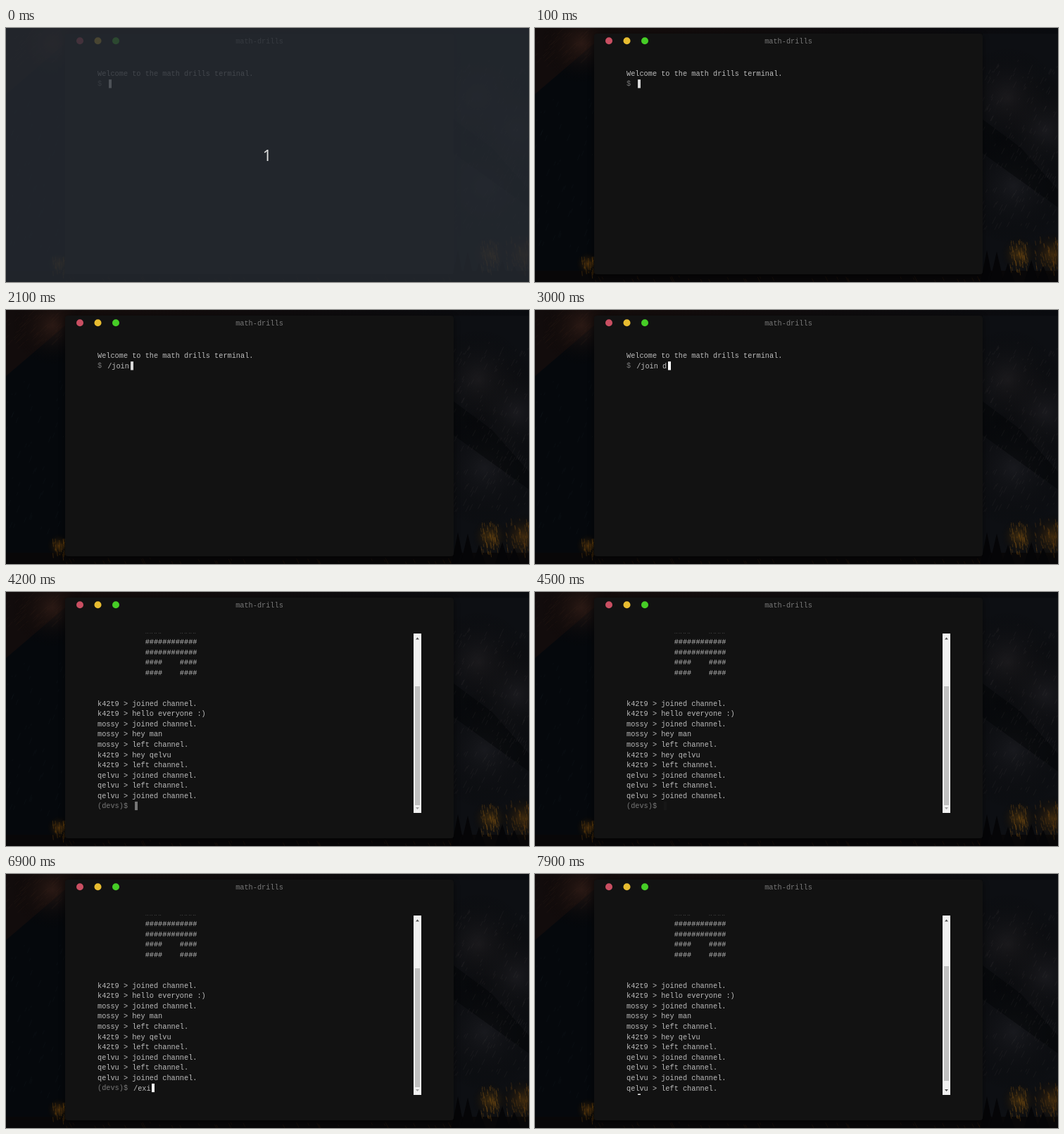
Recreate the animation shown at these times as an HTML page with a canvas. Size 743 by 361 pixels, loop 8000 ms.

```html
<!DOCTYPE html>
<html lang="en">
<head>
<meta charset="utf-8">
<title>Math drills terminal</title>
<style>
  html, body { margin: 0; width: 100%; height: 100%; overflow: hidden; background: #06080b; }
  canvas, svg { position: absolute; left: 0; top: 0; width: 743px; height: 361px; }
  text { font: 10.25px "Liberation Mono", "Courier New", monospace; fill: #bcbcbc; white-space: pre; }
  .dim { fill: #777; }
  .count { font: 22px "Noto Sans", "Open Sans", sans-serif; fill: #dcdcdc; }
</style>
</head>
<body>
<canvas id="scene" width="743" height="361"></canvas>
<svg viewBox="0 0 743 361">
  <defs>
    <clipPath id="pane"><rect x="120" y="58.6" width="459" height="255.4"/></clipPath>
    <filter id="soft" x="-5%" y="-5%" width="110%" height="115%"><feGaussianBlur stdDeviation="4"/></filter>
  </defs>
  <rect x="84" y="10" width="552" height="343" rx="4" opacity=".55" filter="url(#soft)"/>
  <rect x="84" y="8" width="552" height="342" rx="4" fill="#121212"/>
  <circle cx="105" cy="18.2" r="5" fill="#c94f62"/>
  <circle cx="130.5" cy="18.2" r="5" fill="#e8bc30"/>
  <circle cx="156" cy="18.2" r="5" fill="#46cd26"/>
  <text class="dim" x="360" y="22.3" text-anchor="middle">math-drills</text>

  <g clip-path="url(#pane)">
    <g id="intro">
      <text x="130" y="68.3">Welcome to the math drills terminal.</text>
      <text id="notice" x="130" y="82.9">connecting to devs</text>
    </g>
    <g id="log"></g>
    <text id="prompt" class="dim" x="130"></text>
    <text id="input"></text>
    <rect id="cursor" width="4" height="12.2" fill="#fff"/>
  </g>

  <g id="scrollbar">
    <rect x="579" y="59" width="11" height="255" fill="#f1f1f1"/>
    <rect id="thumb" x="581" width="7" fill="#c1c1c1"/>
    <path d="M582 67.5h5l-2.5-3z" fill="#505050"/>
    <path id="down" d="M582 306h5l-2.5 3z"/>
  </g>

  <g id="veil">
    <rect width="743" height="361" fill="#262b33" opacity=".82"/>
    <text class="count" x="371" y="189" text-anchor="middle">1</text>
  </g>
</svg>
<script>
const LOOP = 8000, CHAR = 6.15, ROW = 14.6, LAST = 307.6;
const $ = id => document.getElementById(id);
const show = (id, on) => $(id).setAttribute('visibility', on ? 'visible' : 'hidden');
const set = (id, attrs) => {
  for (const key in attrs) $(id).setAttribute(key, attrs[key]);
};

// Dusky hillside behind the window
function paintScene() {
  const c = $('scene').getContext('2d');
  let seed = 7;
  const rnd = () => (seed = seed * 16807 % 2147483647) / 2147483647;
  const glow = (x, y, r, color) => {
    const g = c.createRadialGradient(x, y, 0, x, y, r);
    g.addColorStop(0, color);
    g.addColorStop(1, 'transparent');
    c.fillStyle = g;
    c.fillRect(x - r, y - r, 2 * r, 2 * r);
  };
  const specks = (n, x, y, w, h, color, slope) => {
    c.strokeStyle = color;
    for (let i = 0; i < n; i++) {
      const px = x + rnd() * w, py = y + rnd() * h, len = 2 + rnd() * 8;
      c.beginPath();
      c.moveTo(px, py);
      c.lineTo(px + slope * len, py + len);
      c.stroke();
    }
  };
  const pine = (x, top, w) => {
    c.fillStyle = '#050507';
    c.beginPath();
    c.moveTo(x, top);
    c.lineTo(x + w, 361);
    c.lineTo(x - w, 361);
    c.fill();
  };

  c.fillStyle = '#05080c';
  c.fillRect(0, 0, 743, 361);
  const sky = c.createLinearGradient(0, 0, 743, 0);
  sky.addColorStop(0, '#170e0c');
  sky.addColorStop(.45, '#100c0d');
  sky.addColorStop(1, '#090b0f');
  c.fillStyle = sky;
  c.fillRect(0, 0, 743, 10);

  c.fillStyle = '#120c0c';
  c.beginPath();
  c.moveTo(0, 0);
  c.lineTo(110, 0);
  c.lineTo(0, 94);
  c.fill();
  glow(66, 22, 60, 'rgba(62,36,27,.55)');
  specks(60, 0, 0, 84, 46, 'rgba(80,50,38,.14)', -1);
  specks(50, 0, 100, 84, 220, 'rgba(40,50,58,.14)', -.4);

  c.fillStyle = '#0d0f13';
  c.fillRect(636, 8, 107, 353);
  glow(672, 100, 75, 'rgba(42,38,40,.5)');
  glow(725, 145, 80, 'rgba(38,36,40,.5)');
  glow(680, 225, 85, 'rgba(32,32,37,.6)');
  c.fillStyle = 'rgba(4,6,9,.55)';
  c.beginPath();
  c.moveTo(636, 130);
  c.lineTo(690, 170);
  c.lineTo(743, 230);
  c.lineTo(743, 255);
  c.lineTo(636, 178);
  c.fill();
  specks(190, 638, 45, 105, 240, 'rgba(92,84,84,.13)', -.5);

  c.fillStyle = '#080708';
  c.fillRect(0, 345, 743, 16);
  glow(75, 335, 18, 'rgba(104,64,12,.65)');
  specks(26, 66, 324, 18, 24, 'rgba(150,92,16,.3)', .1);
  glow(688, 322, 27, 'rgba(105,68,12,.6)');
  glow(735, 322, 34, 'rgba(92,58,12,.65)');
  specks(65, 674, 300, 26, 44, 'rgba(150,98,20,.3)', .15);
  specks(55, 710, 296, 33, 50, 'rgba(140,88,18,.28)', .15);
  for (const [x, top, w] of [[642, 316, 9], [656, 318, 10], [672, 334, 9], [705, 330, 10], [722, 338, 9]])
    pine(x, top, w);
  specks(36, 80, 352, 560, 6, 'rgba(90,54,16,.2)', .5);
}

const lines = [
  '####    ####', '############', '############', '####    ####', '####    ####', '', '',
  'k42t9 > joined channel.', 'k42t9 > hello everyone :)', 'mossy > joined channel.',
  'mossy > hey man', 'mossy > left channel.', 'k42t9 > hey qelvu', 'k42t9 > left channel.',
  'qelvu > joined channel.', 'qelvu > left channel.', 'qelvu > joined channel.', 'qelvu > left channel.'
];

function buildLog() {
  lines.forEach((line, i) => {
    const row = document.createElementNS('http://www.w3.org/2000/svg', 'text');
    row.setAttribute('x', i < 5 ? 130 + 11 * CHAR : 130);
    row.setAttribute('y', LAST - ROW * (lines.length - 1 - i));
    row.textContent = line;
    $('log').append(row);
  });
}

const joinTimes = [1000, 1600, 1800, 2000, 2100, 2200, 2700, 3100, 3200, 3400];
const exitTimes = [6400, 6500, 6700, 6800, 7000];
const typed = (text, times, t) => text.slice(0, times.filter(at => at <= t).length);

// Cursor opacity over one second: [time, level]
const blink = [[0, 1], [100, .84], [200, .42], [300, .2], [400, .04], [500, .02], [600, .02], [700, .5], [800, .9], [1000, 1]];
function pulse(t) {
  const p = t % 1000;
  const i = blink.findIndex(([at]) => at > p);
  const [a, from] = blink[i - 1], [b, to] = blink[i];
  return from + (to - from) * (p - a) / (b - a);
}

function draw(t) {
  const connecting = t >= 3700, joined = t >= 4100, left = t >= 7200;
  const prompt = joined && !left ? '(devs)$' : '$';
  const input = joined ? (left ? '' : typed('/exit', exitTimes, t))
                       : (connecting ? '' : typed('/join devs', joinTimes, t));
  const base = left ? LAST + ROW : joined ? LAST : connecting ? 97.5 : 82.9;
  const start = 130 + prompt.length * CHAR + 8;

  show('veil', t < 100);
  show('intro', !joined);
  $('notice').style.display = connecting ? '' : 'none';
  show('log', joined);
  show('scrollbar', joined);
  $('log').lastChild.style.display = left ? '' : 'none';

  $('prompt').textContent = prompt;
  set('prompt', { y: base - .7 });
  $('input').textContent = input;
  set('input', { x: start, y: base });
  set('cursor', {
    x: Math.round(start + 2 + input.length * CHAR - .3),
    y: base - 9.7,
    opacity: pulse(t)
  });
  set('thumb', left ? { y: 131, height: 163 } : { y: 134, height: 169 });
  set('down', { fill: left ? '#505050' : '#a3a3a3' });
}

paintScene();
buildLog();
const t0 = performance.now();
function tick() {
  draw((performance.now() - t0) % LOOP);
  requestAnimationFrame(tick);
}
tick();
</script>
</body>
</html>
```
